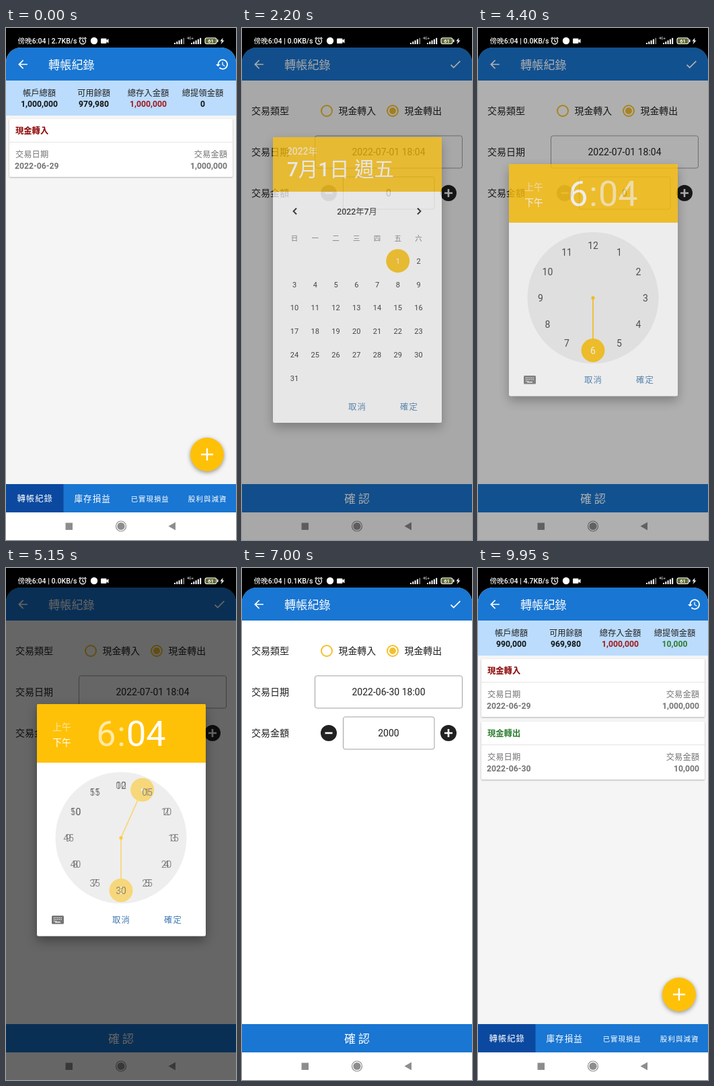
Write an HTML page that moves like this. It is 342 px wide and 760 px high and loops after 10000 ms.

```html
<!DOCTYPE html>
<html lang="zh-Hant">
<head>
<meta charset="utf-8">
<title>轉帳紀錄</title>
<style>
  html, body { margin: 0; width: 100%; height: 100%; overflow: hidden; background: #000; }
  svg { display: block; width: 342px; height: 760px; }
  text { font-family: Roboto, "Noto Sans CJK TC", "Noto Sans CJK", sans-serif; white-space: pre; }
  .mid { text-anchor: middle; }
  .end { text-anchor: end; }
  .med { font-weight: 500; }
  .bold { font-weight: 700; }
  .wide { letter-spacing: 1px; }
  .card { filter: drop-shadow(0 1px 1px rgba(0,0,0,.28)); }
  .raised { filter: drop-shadow(0 2px 3px rgba(0,0,0,.4)); }
  .dialog { filter: drop-shadow(0 7px 8px rgba(0,0,0,.35)); }
  .anim { animation: 10s linear infinite; }

  #form { animation-name: page; }
  #scrim { animation-name: dim; }
  #datePicker { animation-name: dateFade; }
  #timePicker { animation-name: timeFade; }
  #july { animation-name: july; }
  #june { animation-name: june; }
  #hours { animation-name: hours; }
  #minutes { animation-name: minutes; }
  #fabRipple { animation-name: fabRipple; }
  #radioRipple { animation-name: radioRipple; }
  #prevRipple { animation-name: prevRipple; }

  @keyframes page {
    0%, 6.8% { transform: translateX(342px); animation-timing-function: cubic-bezier(.2,.7,.3,1); }
    9.5%, 90.3% { transform: none; animation-timing-function: cubic-bezier(.3,.2,.3,1); }
    93%, 100% { transform: translateX(342px); }
  }
  @keyframes dim {
    0%, 20.7% { opacity: 0; }
    23%, 42.3% { opacity: .6; }
    43.4% { opacity: .15; }
    44% { opacity: .31; }
    45%, 59.4% { opacity: .6; }
    60% { opacity: .54; }
    61.5%, 100% { opacity: 0; }
  }
  @keyframes dateFade {
    0%, 20.7% { opacity: 0; }
    22.5%, 42.3% { opacity: 1; }
    43.5%, 100% { opacity: 0; }
  }
  @keyframes timeFade {
    0%, 43.3% { opacity: 0; }
    44% { opacity: .78; }
    44.7%, 59.4% { opacity: 1; }
    60% { opacity: .83; }
    61.2%, 100% { opacity: 0; }
  }
  @keyframes july {
    0%, 35.5% { transform: none; animation-timing-function: ease-out; }
    38%, 100% { transform: translateX(251px); }
  }
  @keyframes june {
    0%, 35.5% { transform: translateX(-251px); animation-timing-function: ease-out; }
    38%, 100% { transform: none; }
  }
  @keyframes hours {
    0%, 50% { opacity: 1; }
    53%, 100% { opacity: 0; }
  }
  @keyframes minutes {
    0%, 50% { opacity: 0; }
    53%, 100% { opacity: 1; }
  }
  @keyframes fabRipple {
    0%, 3.9% { opacity: 0; r: 6px; }
    4.5% { opacity: .25; r: 18px; }
    5.1%, 100% { opacity: 0; r: 25px; }
  }
  @keyframes radioRipple {
    0%, 13.8% { opacity: 0; r: 5px; }
    15% { opacity: .12; r: 16px; }
    16.8%, 100% { opacity: 0; r: 18px; }
  }
  @keyframes prevRipple {
    0%, 34.9% { opacity: 0; r: 9px; }
    35.5% { opacity: .07; r: 12px; }
    36.5% { opacity: .1; r: 17px; }
    38%, 100% { opacity: 0; r: 18px; }
  }
</style>
</head>
<body>
<svg id="stage" viewBox="0 0 342 760"></svg>
<script>
const BLUE = '#1976d2', AMBER = '#ffc107', RADIO = '#f4c02e', INK = '#212121', GREY = '#757575';
const ARROW = 'M20 11H7.83l5.59-5.59L12 4l-8 8 8 8 1.41-1.41L7.83 13H20z';
const TICK = 'M9 16.17 4.83 12l-1.42 1.41L9 19 21 7l-1.41-1.41z';
const HISTORY = 'M13 3a9 9 0 0 0-9 9H1l3.9 3.9L9 12H6a7 7 0 1 1 2.06 4.94l-1.42 1.42A9 9 0 1 0 13 3zm-1 5v5l4.28 2.54.72-1.21-3.5-2.08V8z';

const text = (x, y, size, str, fill = INK, cls = '', id = '') =>
  `<text x="${x}" y="${y}" font-size="${size}" fill="${fill}" class="${cls}" id="${id}">${str}</text>`;
const rect = (x, y, w, h, fill, more = '') =>
  `<rect x="${x}" y="${y}" width="${w}" height="${h}" fill="${fill}" ${more}/>`;
const circle = (x, y, r, fill, more = '') =>
  `<circle cx="${x}" cy="${y}" r="${r}" fill="${fill}" ${more}/>`;
const line = (d, color, width, more = '') =>
  `<path d="${d}" fill="none" stroke="${color}" stroke-width="${width}" ${more}/>`;
const icon = (x, d) => `<path transform="translate(${x} 43.7) scale(.857)" d="${d}" fill="#fff"/>`;
const range = n => [...Array(n).keys()];

const header = action => rect(0, 29, 342, 49, BLUE) + icon(14.7, ARROW) +
  text(63, 61, 17.2, '轉帳紀錄', '#fff') + action;

const card = (y, title, color, date, amount) =>
  rect(5, y, 332, 86, '#fff', 'rx="1.5" class="card"') +
  text(14, y + 22, 12.3, title, color, 'bold') +
  rect(5, y + 34, 332, 1, '#e4e4e4') +
  text(14, y + 57, 12.3, '交易日期', GREY) + text(329, y + 57, 12.3, '交易金額', GREY, 'end') +
  text(13, y + 74, 12.2, date, GREY, 'bold') + text(329, y + 74, 12.2, amount, GREY, 'bold end');

function listPage() {
  const totals = [['帳戶總額', '#111'], ['可用餘額', '#111'], ['總存入金額', '#a01818'], ['總提領金額', '#111']];
  const tabs = [['轉帳紀錄', 12.4], ['庫存損益', 12.6], ['已實現損益', 10.4], ['股利與減資', 10.6]];
  return rect(0, 29, 342, 690, '#f5f5f5') + header(icon(311.1, HISTORY)) +
    rect(0, 78, 342, 52, '#bbdcfd') +
    totals.map(([name, color], i) => text(49.5 + 81 * i, 101, 12.3, name, '#222', 'mid') +
      text(49.5 + 81 * i, 117, 12.2, '', color, 'mid bold', 'total' + i)).join('') +
    card(135, '現金轉入', '#8b0000', '2022-06-29', '1,000,000') +
    `<g id="newCard">${card(228, '現金轉出', '#2e7d32', '2022-06-30', '10,000')}</g>` +
    circle(299, 633, 25, AMBER, 'class="raised"') +
    circle(299, 633, 6, '#fff', 'id="fabRipple" class="anim"') +
    line('M290 633h18M299 624v18', '#fff', 2.4) +
    rect(0, 677, 342, 42, BLUE) + rect(0, 677, 85.5, 42, '#0b49a0') +
    tabs.map(([name, size], i) => text(43.2 + 85.5 * i, 702.5, size, name, '#fff', 'mid wide')).join('');
}

const radio = (x, id) => circle(x, 123, 8, 'none', `stroke="${RADIO}" stroke-width="2"`) +
  circle(x, 123, 5, RADIO, `id="${id}"`);
const field = (x, y, w) => rect(x, y, w, 48, '#fff', 'rx="3" stroke="#a0a0a0"');

function formPage() {
  return rect(0, 29, 342, 690, '#fff') + header(icon(307, TICK)) +
    ['交易類型', '交易日期', '交易金額'].map((s, i) => text(14, [128, 189, 250][i], 14, s)).join('') +
    circle(224, 123, 5, '#000', 'id="radioRipple" class="anim"') +
    radio(126, 'dotIn') + text(143.5, 128, 13.9, '現金轉入') +
    radio(224, 'dotOut') + text(241.5, 128, 13.9, '現金轉出') +
    field(108.5, 160, 219) + text(218, 189, 14, '', INK, 'mid', 'date') +
    field(150.5, 221, 135.5) + text(218, 250, 14, '', INK, 'mid', 'amount') +
    circle(129, 245, 12, INK, 'id="minus"') + line('M123.5 245h11', '#fff', 2.6) +
    circle(307, 245, 12, INK) + line('M301 245h12M307 239v12', '#fff', 2.6) +
    rect(0, 677, 342, 42, BLUE) + text(171, 705, 17, '確 認', '#fff', 'mid');
}

const buttons = y => ['取消', '確定'].map((s, i) =>
  text(171.5 + 77 * i, y, 12.4, s, '#4179b0', 'mid wide')).join('');

// Cell centre for a day, given the weekday of the 1st
const cell = (day, first) => {
  const i = day - 1 + first;
  return [78 + 30.75 * (i % 7), 345.7 + 34.85 * Math.floor(i / 7)];
};
const dayText = (day, first, color) => {
  const [x, y] = cell(day, first);
  return text(x, y + 4, 11, day, color, 'mid');
};
const picked = (day, first) => {
  const [x, y] = cell(day, first);
  return circle(x, y, 17.5, AMBER) + dayText(day, first, '#fff');
};
const month = (days, first) => range(days).map(i => dayText(i + 1, first, INK)).join('');

function datePicker() {
  return rect(46, 162, 251, 424, '#fff', 'rx="2.5" class="dialog"') +
    `<path d="M46 243v-78.500q0-2.500 2.500-2.500h246q2.500 0 2.500 2.500V243z" fill="${AMBER}"/>` +
    text(67, 188, 13.8, '2022年', 'rgba(255,255,255,.75)', 'med') +
    text(67, 220, 29.5, '', '#fff', 'med', 'dateTitle') +
    circle(68, 272, 9, '#000', 'id="prevRipple" class="anim"') +
    line('M81 267.500l-4.500 4.500 4.500 4.500M261 267.500l4.500 4.500-4.500 4.500', '#111', 1.9) +
    text(171, 277, 12.3, '', INK, 'mid med', 'monthTitle') +
    [...'日一二三四五六'].map((s, i) => text(78 + 30.75 * i, 315.5, 10.5, s, GREY, 'mid')).join('') +
    `<g clip-path="url(#dates)">
      <g id="july" class="anim">${month(31, 5)}${picked(1, 5)}</g>
      <g id="june" class="anim">${month(30, 3)}<g id="june30">${picked(30, 3)}</g></g>
    </g>` + buttons(566.5);
}

const CX = 171, CY = 400.5;
const onDial = (turn, r = 78) => [CX + r * Math.sin(turn * 2 * Math.PI), CY - r * Math.cos(turn * 2 * Math.PI)];
const hand = turn => {
  const [x, y] = onDial(turn);
  return line(`M${CX} ${CY}L${x} ${y}`, AMBER, 1.8) + circle(CX, CY, 2.6, AMBER) + circle(x, y, 17.5, AMBER);
};
const dial = (label, active) => range(12).map(i => {
  const [x, y] = onDial(i / 12);
  return text(x, y + 5, 14, label(i), i === active ? '#fff' : '#333', 'mid');
}).join('');
const twoDigits = n => String(n).padStart(2, '0');

function timePicker() {
  const minute = i => twoDigits(i * 5);
  const keys = range(12).map(i => rect(71 + 2.6 * (i % 5), 518.5 + 2.6 * Math.floor(i / 5), 1.3, 1.3, '#fff')).join('');
  return rect(46, 202, 251, 344.5, '#fff', 'rx="2.5" class="dialog"') +
    `<path d="M46 289v-84.500q0-2.500 2.500-2.500h246q2.500 0 2.500 2.500V289z" fill="${AMBER}"/>` +
    text(83, 241, 13.7, '上午', 'rgba(255,255,255,.6)', 'mid') + text(83, 263.500, 13.7, '下午', '#fff', 'mid med') +
    text(163.5, 264, 52, '6', '#fff', 'end', 'hourText') +
    text(171.5, 264, 52, ':', 'rgba(255,255,255,.65)', 'mid') +
    text(179, 264, 52, '', '#fff', '', 'minuteText') +
    circle(CX, CY, 97.5, '#eee') +
    `<g id="hours" class="anim">${hand(.5)}${dial(i => i || 12, 6)}</g>
     <g id="minutes" class="anim">
       <g id="min04">${hand(4 / 60)}${circle(...onDial(4 / 60), 2, '#fff')}${dial(minute, -1)}</g>
       <g id="min00">${hand(0)}${dial(minute, 0)}</g>
     </g>` +
    rect(68, 516, 18, 12.500, GREY, 'rx="1.5"') + keys + rect(73, 525, 8, 1.3, '#fff') + buttons(527);
}

const bars = (x, dimmed) => range(5).map(i =>
  rect(x + 3.3 * i, 22 - 1.8 * i, 2, 2 + 1.8 * i, i === dimmed ? '#777' : '#fff')).join('');

function statusBar() {
  return text(17.5, 23, 10.6, '', '#fff', 'med', 'status') +
    circle(114, 19.3, 4.5, 'none', 'stroke="#fff" stroke-width="1.3"') +
    line('M114 16.500v3l2 1.500M108.500 16l2.500-2.200M119.500 16l-2.500-2.200', '#fff', 1.2) +
    circle(131, 19, 5.2, '#fff') +
    rect(141, 15.500, 8.5, 7.5, '#fff', 'rx="1"') + '<path d="M149 18.500l3.500-2.500v6.500l-3.500-2.500z" fill="#fff"/>' +
    bars(250, 4) + bars(275, -1) + text(269, 17, 5.5, '4G+', '#fff') +
    rect(296, 14.7, 17, 8.8, '#5f6b35', 'rx="2.500" stroke="#fff" stroke-width="1.1"') +
    rect(314, 17, 1.5, 4, '#fff') + text(304.5, 21.8, 7.5, '61', '#fff', 'mid bold') +
    '<path d="M322.500 14.500l-4 5h2.500l-1.500 4.500 5-5.500h-2.700z" fill="#fff"/>';
}

const navBar = rect(0, 719, 342, 41, '#fff') + rect(88.500, 734.500, 10.500, 10.500, '#8d8d8d') +
  circle(171, 739.5, 7.5, 'none', 'stroke="#8d8d8d" stroke-width="1.2"') + circle(171, 739.5, 5.6, '#8d8d8d') +
  '<path d="M241.500 739.500l10.500-6v12z" fill="#8d8d8d"/>';

const $ = id => document.getElementById(id);
$('stage').innerHTML = `
  <defs>
    <clipPath id="screen"><path d="M0 760V51a22 22 0 0 1 22-22h298a22 22 0 0 1 22 22v709z"/></clipPath>
    <clipPath id="dates"><rect x="46" y="322" width="251" height="220"/></clipPath>
  </defs>
  ${rect(0, 0, 342, 760, '#000')}
  <g clip-path="url(#screen)">
    ${listPage()}
    <g id="form" class="anim">${formPage()}</g>
    ${navBar}
  </g>
  ${rect(0, 0, 342, 760, '#000', 'id="scrim" class="anim"')}
  <g id="datePicker" class="anim">${datePicker()}</g>
  <g id="timePicker" class="anim">${timePicker()}</g>
  ${statusBar()}`;

const setText = (id, str) => { if ($(id).textContent !== str) $(id).textContent = str; };
const show = (id, on) => $(id).setAttribute('visibility', on ? 'inherit' : 'hidden');
const TAPS = [6600, 6850, 7080, 7320, 7560, 7800, 8100, 8340, 8580, 8800];

function render(t) {
  const speed = t < 250 ? '2.7' : t < 5450 ? '0.0' : t < 9900 ? '0.1' : '4.7';
  const taps = TAPS.filter(tap => t >= tap).length;
  const saved = t >= 5000, out = t >= 1450, minuteMode = t >= 5050, zero = t >= 5450;
  const totals = saved ? ['990,000', '969,980', '1,000,000', '10,000'] : ['1,000,000', '979,980', '1,000,000', '0'];

  setText('status', `傍晚6:04 | ${speed}KB/s`);
  totals.forEach((s, i) => setText('total' + i, s));
  $('total3').setAttribute('fill', saved ? '#2e7d32' : '#111');
  show('newCard', saved);

  show('dotIn', !out);
  show('dotOut', out);
  setText('date', t < 6090 ? '2022-07-01 18:04' : '2022-06-30 18:00');
  setText('amount', String(taps * 1000));
  $('minus').setAttribute('fill', taps ? INK : '#9e9e9e');

  setText('dateTitle', t < 3950 ? '7月1日 週五' : '6月30日 週四');
  setText('monthTitle', t < 3650 ? '2022年7月' : '2022年6月');
  show('june30', t >= 3950);

  setText('minuteText', zero ? '00' : '04');
  $('hourText').setAttribute('fill-opacity', minuteMode ? .65 : 1);
  $('minuteText').setAttribute('fill-opacity', minuteMode ? 1 : .65);
  show('min04', !zero);
  show('min00', zero);
}

const start = performance.now();
function tick() {
  render((performance.now() - start) % 10000);
  requestAnimationFrame(tick);
}
tick();
</script>
</body>
</html>
```
